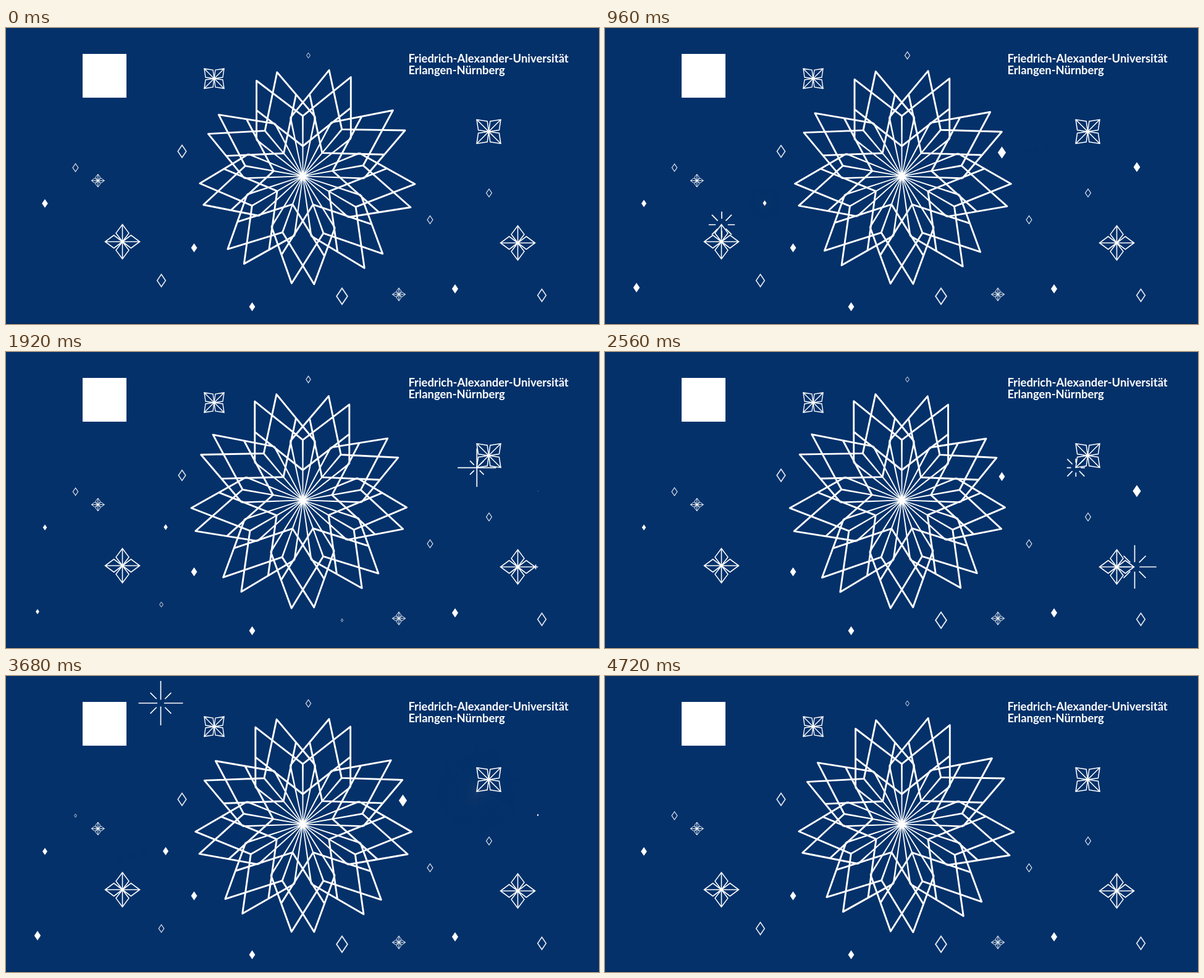
Recreate the animation shown at these times as an HTML page with a canvas. Size 960x480 px, loop 4800 ms.

```html
<!DOCTYPE html>
<html lang="de">
<head>
<meta charset="utf-8">
<title>Blossom</title>
<style>
html, body { margin: 0; width: 100%; height: 100%; overflow: hidden; background: #04316a; }
canvas, svg { position: absolute; left: 0; top: 0; width: 960px; height: 480px; }
text { font: bold 18.4px Lato, sans-serif; fill: #fff; }
</style>
</head>
<body>
<svg viewBox="0 0 960 480">
  <rect width="960" height="480" fill="#04316a"/>
  <rect y="479" width="960" height="1" fill="#03264f"/>
  <rect x="124" y="42" width="71" height="71" fill="#fff"/>
  <text x="651.4" y="55.8">Friedrich-Alexander-Universität</text>
  <text x="651.4" y="75.4">Erlangen-Nürnberg</text>
</svg>
<canvas id="stage" width="960" height="480"></canvas>
<script>
const LOOP = 4800, STEP = 80, TAU = Math.PI * 2;
const CX = 480.5, CY = 240.3;
const ctx = document.getElementById('stage').getContext('2d');
const rad = d => d * Math.PI / 180;
const polar = (deg, r, x = 0, y = 0) => [x + r * Math.sin(rad(deg)), y - r * Math.cos(rad(deg))];
const mid = (a, b) => [(a[0] + b[0]) / 2, (a[1] + b[1]) / 2];
const clamp = v => Math.max(0, Math.min(1, v));

// Signed distance to a moment on the loop
const since = (t, at) => ((t - at + LOOP * 1.5) % LOOP) - LOOP / 2;

// Soft hill: 1 at its moment, 0 beyond half its span
function bump(t, at, half) {
  const d = Math.abs(since(t, at));
  return d < half ? .5 + .5 * Math.cos(Math.PI * d / half) : 0;
}

function poly(points, close) {
  points.forEach(([x, y], i) => i ? ctx.lineTo(x, y) : ctx.moveTo(x, y));
  if (close) ctx.closePath();
}

// Blossom: 18 rhombi swaying about the vertical axis
const SIDE = 97.6, HALF = 26, TIP = 2 * SIDE * Math.cos(rad(HALF));

function project([x, y], t) {
  const c = Math.cos(TAU * (t + 40) / LOOP);
  const px = x * Math.cos(rad(7 * c));
  const depth = 1 - .0425 * c * px / 174;
  return [CX + px / depth, CY + y / depth];
}

// Spoke narrowing towards the centre
function spoke([x, y]) {
  const len = Math.hypot(x - CX, y - CY), nx = (y - CY) / len, ny = (CX - x) / len;
  poly([[CX - nx * .7, CY - ny * .7], [CX + nx * .7, CY + ny * .7],
    [x + nx * 1.4, y + ny * 1.4], [x - nx * 1.4, y - ny * 1.4]], true);
}

function blossom(t) {
  const lines = [], spokes = [];
  for (let a = 0; a < 360; a += 40) {
    for (const s of [-1, 1]) {
      const axis = a + 14 * s, tip = polar(axis, TIP);
      const inner = polar(axis + HALF * s, SIDE), outer = polar(axis - HALF * s, SIDE);
      lines.push([inner, tip, outer], [mid(tip, outer), mid([0, 0], inner)]);
      spokes.push(outer);
    }
    spokes.push(polar(a, SIDE));
  }
  ctx.lineWidth = 2.9;
  ctx.beginPath();
  lines.forEach(l => poly(l.map(p => project(p, t))));
  ctx.stroke();
  ctx.beginPath();
  spokes.forEach(p => spoke(project(p, t)));
  ctx.fill();
}

// Four-petalled stars: x, y, radius, turn
const stars = [[188.5, 346.5, 28, 0], [828.5, 348.5, 28, 0], [781.5, 168, 27.5, 45],
  [337, 82, 22.7, 45], [148.8, 247.5, 10.5, 0], [636, 432, 10.5, 0]];

function star([x, y, r, turn]) {
  ctx.lineWidth = .6 + r * .035;
  ctx.beginPath();
  for (let a = turn; a < 360; a += 90) {
    const at = (deg, k) => polar(a + deg, r * k, x, y);
    poly([[x, y], at(-37, .62), at(0, 1), at(37, .62)], true);
    poly([[x, y], at(0, 1)]);
  }
  ctx.stroke();
}

// Diamonds that shrink around given moments: x, y, half height, depth, half span, moments
const hollow = [
  [489.5, 44.5, 6, .28, 1100, 0, 2640],
  [285, 200, 10, .16, 900, 1600],
  [112.5, 226.5, 6.5, 1, 560, 1440, 3980],
  [782, 267.5, 6.5],
  [686.5, 311, 6.5],
  [251.5, 409.5, 10, 1, 1500, 2720],
  [544, 435, 13, 1, 400, 2090],
  [867.5, 433.5, 10]
];
const solid = [
  [63, 284.5, 7.1, .32, 2400, 2360],
  [304.5, 356.5, 7.2],
  [398.5, 452, 7.2, 1, 320, 1280],
  [727, 423, 7.4],
  [642.5, 202, 9.7, 1, 680, 0, 2080]
];
// Diamonds that pop up and slowly fade: x, y, half height, moments
const popping = [
  [861, 225.5, 9.8, 160, 2100],
  [258.5, 284, 8.8, 760, 2816],
  [51, 421, 9.6, 640, 2860]
];

const shrink = (t, depth = 0, half = 1, ...at) =>
  1 - depth * clamp(1.3 * at.reduce((sum, m) => sum + bump(t, m, half), 0));

const pop = (t, moments) =>
  Math.max(...moments.map(m => clamp(Math.min((t - m) / 400, (m + 1840 - t) / 1280))));

function diamond(x, y, h) {
  const w = h * .68;
  ctx.beginPath();
  poly([[x, y - h], [x + w, y], [x, y + h], [x - w, y]], true);
}

function diamonds(t) {
  for (const [x, y, h, ...dip] of solid) {
    diamond(x, y, h * shrink(t, ...dip));
    ctx.fill();
  }
  for (const [x, y, h, ...moments] of popping) {
    diamond(x, y, h * pop(t, moments));
    ctx.fill();
  }
  ctx.globalAlpha = .9;
  for (const [x, y, h, ...dip] of hollow) {
    const size = h * shrink(t, ...dip);
    if (size < .5) continue;
    ctx.lineWidth = .5 + size * .11;
    diamond(x, y, size);
    ctx.stroke();
  }
  ctx.globalAlpha = 1;
}

// Eight-rayed sparkles: x, y, moment of greatest reach
const sparks = [[189, 319, 600], [762.3, 187.6, 2120], [857.5, 348.5, 2480], [250.5, 44, 3680]];

function spark([x, y, at], t) {
  const d = since(t, at);
  const reach = (delay, half) => Math.cos(Math.PI / 2 * Math.min(1, Math.abs(d - delay) / half));
  const main = 36 * reach(0, 600), diag = 26 * reach(160, 620);
  const gap = clamp(.15 + d / 1150);
  ctx.lineWidth = 1.7;
  ctx.beginPath();
  for (let a = 0; a < 360; a += 90) {
    if (main > .1) poly([polar(a, main * gap, x, y), polar(a, main, x, y)]);
    if (diag > .1) poly([polar(a + 45, diag * .4, x, y), polar(a + 45, diag, x, y)]);
  }
  ctx.stroke();
}

// Lens flares with seeded streaks
let seed = 7;
const rnd = () => (seed = seed * 16807 % 2147483647) / 2147483647;
const streaks = Array.from({ length: 70 }, (_, i) => {
  const warm = i % 2;
  return { turn: rnd() * 360, len: warm ? 14 + rnd() * 26 : 45 + rnd() * 85,
    w: (warm ? .5 : 1.8) * (1 + rnd() * 3), color: warm ? '225,130,85' : '80,105,130', alpha: warm ? .45 : .12 };
});

function radial(x, y, r, ...stops) {
  const g = ctx.createRadialGradient(x, y, 0, x, y, r);
  stops.forEach((c, i) => g.addColorStop(i / (stops.length - 1), `rgba(${c})`));
  ctx.fillStyle = g;
}

function disc(x, y, r) {
  ctx.beginPath();
  ctx.arc(x, y, r, 0, TAU);
  ctx.fill();
}

function flare(x, y, power, size) {
  if (power <= 0) return;
  ctx.save();
  ctx.globalCompositeOperation = 'lighter';
  ctx.globalAlpha = power;
  radial(x, y, 95 * size, '60,80,100,.2', '40,70,110,.06', '40,70,110,0');
  disc(x, y, 95 * size);
  radial(x, y, 30 * size, '255,220,190,.9', '220,115,70,.4', '160,80,50,.15', '120,60,40,0');
  disc(x, y, 30 * size);
  for (const { turn, len, w, color, alpha } of streaks) {
    const r = len * size, bend = Math.atan(w / len) * 80;
    radial(x, y, r, `${color},${alpha}`, `${color},0`);
    ctx.beginPath();
    poly([[x, y], polar(turn - bend, r * .7, x, y), polar(turn, r, x, y), polar(turn + bend, r * .7, x, y)], true);
    ctx.fill();
  }
  // Faint reflections across the centre
  ctx.fillStyle = 'rgba(30,75,120,.14)';
  for (let i = 0; i < 4; i++) {
    const f = i ? -.84 - i * .07 : -.4;
    disc(CX + (CX - x) * -f, CY + (CY - y) * -f, (i ? 5 : 9) * size);
  }
  ctx.restore();
}

function flares(t) {
  const [x, y] = project(polar(54, TIP), t);
  flare(x, y, bump(t, 1280, 340), 1);
  flare(258.5, 284, .6 * bump(t, 1260, 340), .75);
  flare(642.5, 202, .8 * bump(t, 3040, 320), .75);
  flare(762.5, 187.5, bump(t, 4060, 440), 1.05);
}

function draw(t) {
  ctx.clearRect(0, 0, 960, 480);
  flares(t);
  ctx.fillStyle = ctx.strokeStyle = '#fff';
  ctx.lineJoin = 'round';
  blossom(t);
  ctx.lineJoin = 'miter';
  stars.forEach(star);
  sparks.forEach(s => spark(s, t));
  diamonds(t);
}

const start = performance.now();
function tick() {
  const t = (performance.now() - start) % LOOP;
  draw(Math.floor(t / STEP) * STEP);
  requestAnimationFrame(tick);
}
tick();
</script>
</body>
</html>
```
